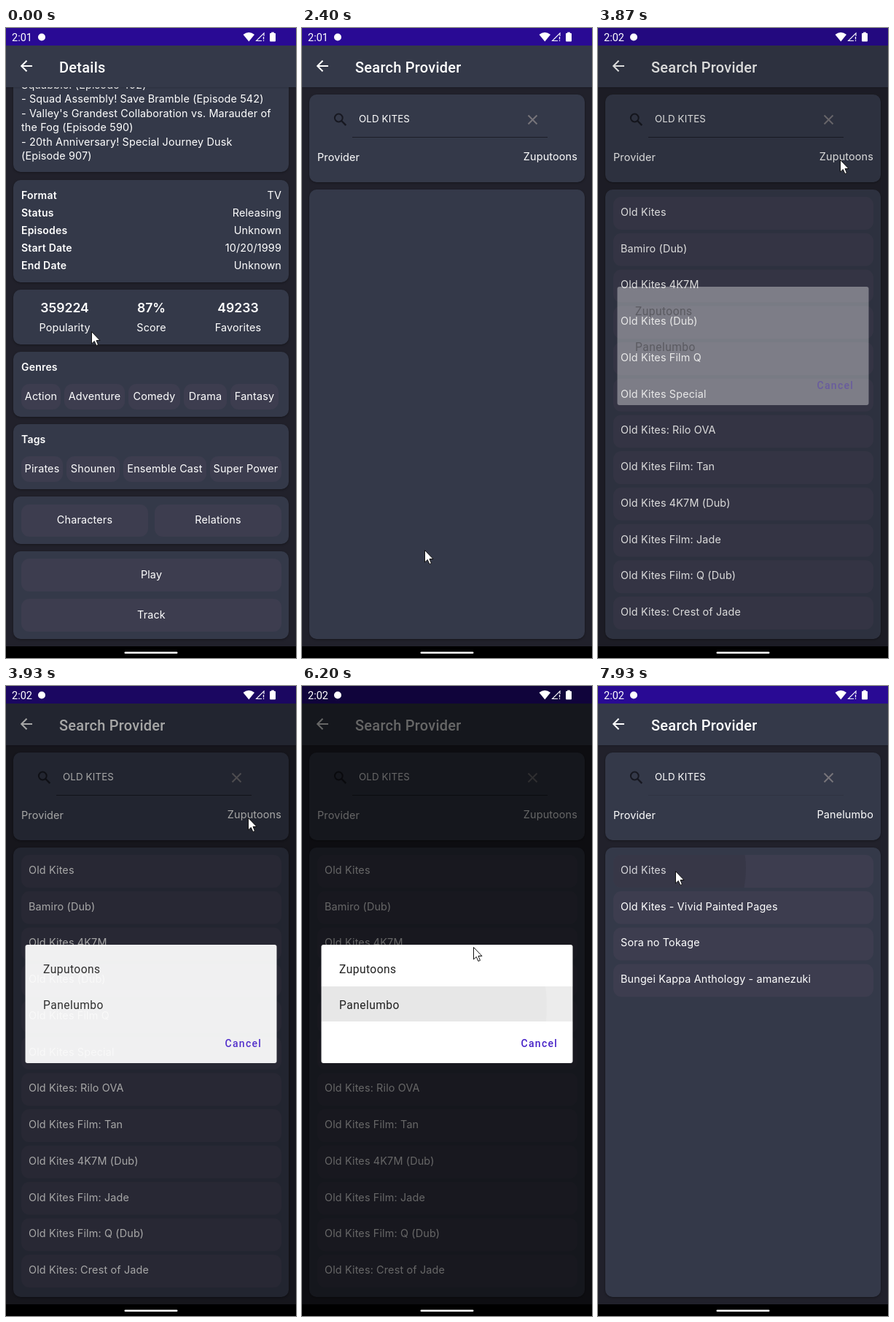
These frames come from a looping animation (398x862 px, 8000 ms). An HTML page with a canvas:

```html
<!DOCTYPE html>
<html lang="en">
<head>
<meta charset="utf-8">
<title>Media details and provider search</title>
<style>
  html, body { margin: 0; width: 100%; height: 100%; overflow: hidden; background: #000; }
  canvas { display: block; width: 398px; height: 862px; }
</style>
</head>
<body>
<canvas id="stage"></canvas>
<script>
const W = 398, H = 862, LOOP = 8000, STEP = 1000 / 15;
const canvas = document.getElementById('stage');
const ctx = canvas.getContext('2d');
const dpr = window.devicePixelRatio || 1;
canvas.width = W * dpr;
canvas.height = H * dpr;

const BODY = 'Inter, sans-serif', SYSTEM = 'Roboto, sans-serif';
const COLOR = { bg: '#21212b', card: '#343949', chip: '#3d3d4f', bar: '#290a94', text: '#fff' };

const VIDEO = 'Zuputoons', COMICS = 'Panelumbo', SHOW = 'Old Kites';
const VIDEO_ROWS = [
  SHOW, 'Bamiro (Dub)', SHOW + ' 4K7M', SHOW + ' (Dub)', SHOW + ' Film Q', SHOW + ' Special',
  SHOW + ': Rilo OVA', SHOW + ' Film: Tan', SHOW + ' 4K7M (Dub)', SHOW + ' Film: Jade',
  SHOW + ' Film: Q (Dub)', SHOW + ': Crest of Jade'
];
const COMIC_ROWS = [
  SHOW, SHOW + ' - Vivid Painted Pages', 'Sora no Tokage', 'Bungei Kappa Anthology - amanezuki'
];
const SYNOPSIS = [
  'Squabble! (Episode 492)',
  '- Squad Assembly! Save Bramble (Episode 542)',
  "- Valley's Grandest Collaboration vs. Marauder of",
  'the Fog (Episode 590)',
  '- 20th Anniversary! Special Journey Dusk',
  '(Episode 907)'
];

// time, x, y, easing into this key
const POINTER = [
  [0, 117, 415], [800, 171, 731], [2340, 171, 731], [2400, 168, 714], [2667, 168, 714],
  [2933, 147, 583, 'in'], [3133, 130, 430, 'linear'], [3533, 332, 180, 'out'],
  [4000, 332, 180], [4667, 116, 438], [5467, 116, 438], [5867, 235, 357],
  [6400, 235, 357], [6867, 69, 249], [7800, 69, 249], [7933, 106, 253], [8000, 106, 253]
];
const EASE = {
  linear: p => p,
  in: p => p * (0.6 + 0.4 * p),
  out: p => p * (1.4 - 0.4 * p),
  smooth: p => p * p * (3 - 2 * p)
};

const clamp = v => Math.max(0, Math.min(1, v));
const ramp = (t, from, to) => clamp((t - from) / (to - from));

function random(seed) {
  return () => (seed = (seed * 16807) % 2147483647) / 2147483647;
}

function box(x1, y1, x2, y2, r, fill) {
  ctx.beginPath();
  ctx.roundRect(x1, y1, x2 - x1, y2 - y1, r);
  ctx.fillStyle = fill;
  ctx.fill();
}

function card(y1, y2) {
  ctx.save();
  ctx.shadowColor = 'rgba(0,0,0,.35)';
  ctx.shadowBlur = 3 * dpr;
  ctx.shadowOffsetY = dpr;
  box(10, y1, 388, y2, 10, COLOR.card);
  ctx.restore();
}

function text(str, x, y, o = {}) {
  const { size = 14.4, weight = 400, family = BODY, gap = 0.15, align = 'left', color = COLOR.text } = o;
  ctx.font = `${weight} ${size}px ${family}`;
  ctx.letterSpacing = gap + 'px';
  ctx.textAlign = align;
  ctx.fillStyle = color;
  ctx.fillText(str, x, y);
}

const label = (str, x, y) => text(str, x, y, { size: 14, weight: 600, gap: 0.2 });
const right = (str, y) => text(str, 378, y, { align: 'right' });

function line(points, color, width) {
  ctx.beginPath();
  points.forEach(([x, y], i) => i ? ctx.lineTo(x, y) : ctx.moveTo(x, y));
  ctx.strokeStyle = color;
  ctx.lineWidth = width;
  ctx.stroke();
}

function shape(points, fill) {
  ctx.beginPath();
  points.forEach(([x, y], i) => i ? ctx.lineTo(x, y) : ctx.moveTo(x, y));
  ctx.closePath();
  ctx.fillStyle = fill;
  ctx.fill();
}

function button(str, x1, y1, x2, y2, effect) {
  box(x1, y1, x2, y2, 11, COLOR.chip);
  if (effect) {
    ctx.save();
    ctx.clip();
    effect();
    ctx.restore();
  }
  text(str, (x1 + x2) / 2, (y1 + y2) / 2 + 4, { align: 'center' });
}

function chips(list, y) {
  for (const [str, x1, x2] of list) button(str, x1, y, x2, y + 35);
}

function header(title) {
  ctx.save();
  ctx.shadowColor = 'rgba(0,0,0,.3)';
  ctx.shadowBlur = 3 * dpr;
  box(0, 24, W, 81, 0, COLOR.card);
  ctx.restore();
  text(title, 73, 60.5, { size: 20, weight: 500, family: SYSTEM, gap: 0.25 });
  line([[36, 52], [21.5, 52]], '#fff', 2);
  line([[28.5, 44.7], [21.2, 52], [28.5, 59.3]], '#fff', 2);
}

function playRipple(t) {
  if (t < 1330 || t >= 1730) return;
  const r = 45 + (t - 1333) * 0.95;
  const fade = 1 - 0.7 * ramp(t, 1420, 1540);
  const glow = ctx.createRadialGradient(182, 744, 0, 182, 744, r);
  [[0, 0.27], [0.5, 0.25], [0.78, 0.13], [1, 0]].forEach(([at, a]) =>
    glow.addColorStop(at, `rgba(255,255,255,${a * fade})`));
  ctx.fillStyle = glow;
  ctx.fillRect(21, 726, 357, 45);
  const rnd = random(71);
  for (let i = 0; i < 170; i++) {
    const side = rnd() < 0.5 ? -1 : 1;
    const x = 182 + side * r * (0.6 + 0.4 * rnd());
    const y = 726 + rnd() * 45;
    ctx.fillStyle = `rgba(255,255,255,${0.16 * rnd() * fade})`;
    ctx.fillRect(x, y, 1, 1);
  }
}

function detailsScreen(t) {
  card(60, 197);
  SYNOPSIS.forEach((str, i) => text(str, 21, 82.5 + i * 19.5));

  card(208, 348);
  [['Format', 'TV'], ['Status', 'Releasing'], ['Episodes', 'Unknown'],
   ['Start Date', '10/20/1999'], ['End Date', 'Unknown']].forEach(([key, value], i) => {
    label(key, 21, 234 + i * 24);
    right(value, 234 + i * 24);
  });

  card(358, 433);
  [['359224', 'Popularity', 80.5], ['87%', 'Score', 199.5], ['49233', 'Favorites', 318.5]]
    .forEach(([value, key, x]) => {
      text(value, x, 388.5, { size: 17.6, weight: 600, gap: 0, align: 'center' });
      text(key, x, 415, { align: 'center' });
    });

  card(443, 532);
  label('Genres', 21, 469);
  chips([['Action', 21, 75], ['Adventure', 80, 163], ['Comedy', 168, 239],
         ['Drama', 244, 303], ['Fantasy', 308, 374]], 487);

  card(542, 631);
  label('Tags', 21, 568);
  chips([['Pirates', 21, 78], ['Shounen', 83, 156], ['Ensemble Cast', 161, 275],
         ['Super Power', 280, 378]], 586);

  card(641, 706);
  button('Characters', 21, 652, 195, 696);
  button('Relations', 204, 652, 378, 696);

  card(716, 836);
  button('Play', 21, 726, 378, 771, () => playRipple(t));
  button('Track', 21, 781, 378, 826);
  header('Details');
}

function searchScreen(t) {
  const comics = t >= 6330;
  header('Search Provider');
  card(91, 211);
  ctx.beginPath();
  ctx.arc(50.3, 123, 5.4, 0, Math.PI * 2);
  ctx.strokeStyle = '#171821';
  ctx.lineWidth = 2;
  ctx.stroke();
  line([[54.2, 127], [60.3, 133.2]], '#171821', 2.4);
  text(SHOW.toUpperCase(), 78, 129, { size: 13.3 });
  line([[310.5, 119.5], [322.5, 131.5]], '#77757a', 1.9);
  line([[322.5, 119.5], [310.5, 131.5]], '#77757a', 1.9);
  line([[69, 149.5], [337, 149.5]], t < 6460 ? '#1c1d27' : '#2f3341', 1);
  text('Provider', 21, 181.5);
  right(comics ? COMICS : VIDEO, 181);

  card(221, 836);
  if (t < 2460) return;
  (comics ? COMIC_ROWS : VIDEO_ROWS).forEach((str, i) => {
    const y = 231 + i * 49.73;
    box(21, y, 378, y + 45, 11, COLOR.chip);
    const pressed = i === 0 && t >= 6930;
    if (pressed) {
      ctx.save();
      ctx.clip();
      ctx.beginPath();
      ctx.arc(69, 250, t < 6990 ? 70 : 134, 0, Math.PI * 2);
      ctx.fillStyle = '#373747';
      ctx.fill();
      ctx.restore();
    }
    text(str, 31, y + 26, { color: pressed && t >= 7130 ? '#d6d6da' : '#fff' });
  });
}

function dialog(t) {
  const alpha = t < 6300 ? 0.35 + 0.58 * ramp(t, 3866, 3933) + 0.07 * ramp(t, 3933, 4000)
                         : t < 6390 ? 0.4 : 0;
  if (t < 3860 || !alpha) return;
  ctx.save();
  ctx.globalAlpha = alpha;
  box(26.5, 354, 371.5, 516, 3, '#fff');
  const hover = ramp(t, 4530, 4670);
  if (hover) {
    ctx.save();
    ctx.beginPath();
    ctx.rect(26.5, 411, 345, 48);
    ctx.clip();
    ctx.fillStyle = `rgba(0,0,0,${0.075 * hover})`;
    ctx.fillRect(26, 411, 346, 48);
    if (t >= 5060) {
      ctx.beginPath();
      ctx.arc(116, 438, 50 + 170 * ramp(t, 5066, 5266), 0, Math.PI * 2);
      ctx.fillStyle = 'rgba(0,0,0,.018)';
      ctx.fill();
    }
    ctx.restore();
  }
  const option = { size: 15.6, family: SYSTEM, gap: 0.45, color: '#202020' };
  text(VIDEO, 51, 393, option);
  text(COMICS, 51, 441.5, option);
  text('Cancel', 300.5, 493.5, { size: 14, weight: 500, family: SYSTEM, gap: 1.3, color: '#4722c8' });
  ctx.restore();
}

function dimming(t) {
  if (t < 3860) return 0;
  if (t < 6280) return 0.14 + 0.21 * ramp(t, 3866, 3933) + 0.25 * ramp(t, 3933, 4066);
  return 0.6 * (1 - ramp(t, 6267, 6420));
}

function statusIcons(t) {
  text(t < 3860 ? '2:01' : '2:02', 8, 18, { size: 14.5, family: SYSTEM, gap: 0 });
  ctx.fillStyle = '#fff';
  ctx.beginPath();
  ctx.arc(49, 12.5, 5, 0, Math.PI * 2);
  ctx.fill();
  // wifi
  ctx.beginPath();
  ctx.moveTo(333.3, 18.5);
  ctx.lineTo(325.5, 9);
  ctx.quadraticCurveTo(333.3, 3.2, 341, 9);
  ctx.fill();
  // signal
  line([[351, 17.5], [343.5, 17.5], [354, 7], [354, 11]], '#fff', 1.1);
  line([[353.5, 12], [353.5, 15.5]], '#fff', 1.3);
  line([[353.5, 16.7], [353.5, 18]], '#fff', 1.3);
  // battery
  box(362, 7, 370, 18.5, 1, '#fff');
  box(364.2, 5.7, 367.8, 8, 0, '#fff');
}

function pointer(t) {
  let i = 1;
  while (i < POINTER.length - 1 && t > POINTER[i][0]) i++;
  const [t0, x0, y0] = POINTER[i - 1], [t1, x1, y1, ease = 'smooth'] = POINTER[i];
  const p = EASE[ease](ramp(t, t0, t1));
  ctx.save();
  ctx.translate(x0 + (x1 - x0) * p + 0.5, y0 + (y1 - y0) * p + 0.5);
  shape([[0, 0], [0, 16.5], [3.8, 13], [6.4, 19], [9, 17.9], [6.5, 12], [11.5, 12]], '#fff');
  ctx.strokeStyle = '#111';
  ctx.lineWidth = 1;
  ctx.stroke();
  ctx.restore();
}

function draw(now) {
  const t = Math.floor(((now % LOOP) + 4) / STEP) * STEP;
  ctx.setTransform(dpr, 0, 0, dpr, 0, 0);
  box(0, 0, W, H, 0, COLOR.bg);
  if (t < 2395) detailsScreen(t); else searchScreen(t);
  box(0, 0, W, 24, 0, COLOR.bar);
  const dim = dimming(t);
  if (dim) box(0, 0, W, 846, 0, `rgba(0,0,0,${dim})`);
  statusIcons(t);
  box(0, 846, W, H, 0, '#000');
  box(162.5, 853.4, 235.5, 856, 1.3, '#fff');
  dialog(t);
  pointer(t);
}

const start = performance.now();
function tick() {
  draw(performance.now() - start);
  requestAnimationFrame(tick);
}
tick();
</script>
</body>
</html>
```
